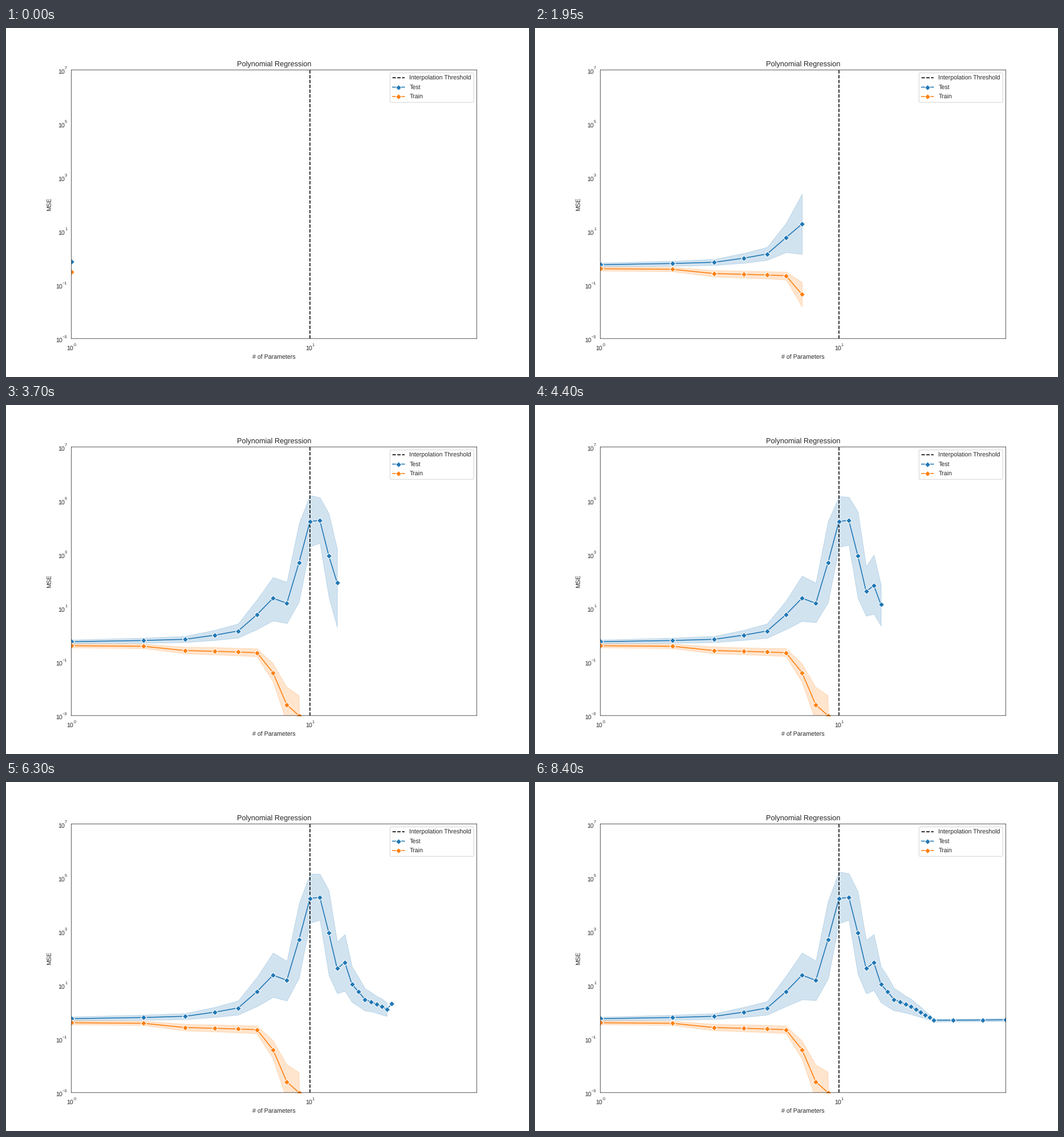
Animation of 917x611 px, one loop 8450 ms. Source, as a matplotlib script:

```python
import numpy as np
import matplotlib.pyplot as plt
from matplotlib.animation import FuncAnimation

W, H = 917, 611
DPI = W / 12
FRAMES, INTERVAL = 169, 50

plt.rcParams.update({
    "font.family": "Liberation Sans",
    "text.color": ".15", "axes.edgecolor": ".15", "axes.linewidth": .72,
    "xtick.bottom": False, "ytick.left": False,
    "lines.solid_capstyle": "round",
    "path.snap": False, "text.hinting": "none",
})

PARAMS = np.array([*range(1, 26), 30, 40, 50])
RUNS = np.array([1.3, -1.1, .6, -1.2, 1.0, -.6])   # scatter of repeated fits
FLOOR = -.3                                        # log10 of the settled error

# Turning points of the mean error: parameters, log10 MSE
TEST = [(1, -.25), (3, -.16), (5, .15), (7, 1.37), (8, 1.18), (10, 4.22),
        (11, 4.27), (13, 1.62), (14, 1.84), (15, 1.03), (17, .47), (20, .2),
        (25, -.31), (50, -.29)]
TRAIN = [(1, -.4), (2, -.42), (3, -.58), (6, -.66), (7, -1.4), (8, -2.6),
         (9, -3), (10, -25)]


def test_spread(level):
    """Uncertainty grows with the error but tightens again at the peak."""
    return .05 + np.minimum(.48 * level, 1.9 * (5 - level))


def train_spread(level):
    return .05 + .27 * level


def simulate(points, spread, runs):
    """log10 errors, one row per parameter count and one column per run."""
    mean = np.interp(PARAMS, *zip(*points))
    sigma = spread(np.abs(mean - FLOOR)) * np.sqrt(len(runs)) / 1.96
    return mean[:, None] + sigma[:, None] * runs


def summarise(sample, rng):
    """Mean and bootstrapped 95% interval."""
    n = len(sample)
    if n == 1:
        return sample[0], np.nan, np.nan
    boot = sample[rng.integers(0, n, (1000, n))].mean(axis=1)
    return sample.mean(), *np.percentile(boot, (2.5, 97.5))


fig, ax = plt.subplots(figsize=(12, (H + 1e-6) / DPI), dpi=DPI)
ax.set(xscale="log", yscale="log", xlim=(1, 50), ylim=(1e-3, 1e7),
       title="Polynomial Regression")
ax.tick_params(which="both", labelbottom=False, labelleft=False)
fig.text(.5125, 1 - 580 / H, "# of Parameters", ha="center", va="baseline")
fig.text(81.5 / W, .495, "MSE", rotation=90, ha="right", va="center")


def power_label(exp, xy, coords, shift, ha):
    """Power of ten with a high-set exponent; shift places the exponent."""
    top = ax.annotate(str(exp).replace("-", "\u2212"), xy, xycoords=coords,
                      xytext=shift, textcoords="offset points",
                      ha=ha, va="baseline", size=7)
    ax.annotate("10", (0, 0), xycoords=top, xytext=(0, -5.5),
                textcoords="offset points", ha="right", va="baseline")


for e in (0, 1):
    power_label(e, (10 ** e, 0), ax.get_xaxis_transform(), (3.6, -12), "left")
for e in range(-3, 8, 2):
    power_label(e, (0, 10.0 ** e), ax.get_yaxis_transform(), (-7, 1.1), "right")

ax.axvline(10, color="black", ls="--", label="Interpolation Threshold")


class Curve:
    def __init__(self, label, color, errors):
        self.color, self.errors = color, errors
        self.line, = ax.plot([], [], color=color, marker="D", label=label,
                             markeredgecolor="white", markeredgewidth=1)
        self.band = None

    def update(self, seen, rng):
        groups = np.split(self.errors.ravel()[:seen],
                          range(len(RUNS), seen, len(RUNS)))
        stats = [summarise(sample, rng) for sample in groups]
        mean, low, high = 10.0 ** np.array(stats).T
        x = PARAMS[:len(groups)]
        self.line.set_data(x, mean)
        if self.band is not None:
            self.band.remove()
        self.band = ax.fill_between(x, low, high, color=self.color, alpha=.2)


curves = [
    Curve("Test", "tab:blue", simulate(TEST, test_spread, RUNS)),
    Curve("Train", "tab:orange", simulate(TRAIN, train_spread, -RUNS)),
]
ax.legend(loc="upper right", labelspacing=.58)


def draw(frame):
    rng = np.random.default_rng(frame)
    seen = min(frame + 1, len(PARAMS) * len(RUNS))
    for curve in curves:
        curve.update(seen, rng)
    return [curve.line for curve in curves]


anim = FuncAnimation(fig, draw, frames=FRAMES, interval=INTERVAL,
                     repeat=True, repeat_delay=0, blit=False)
plt.show()
```
